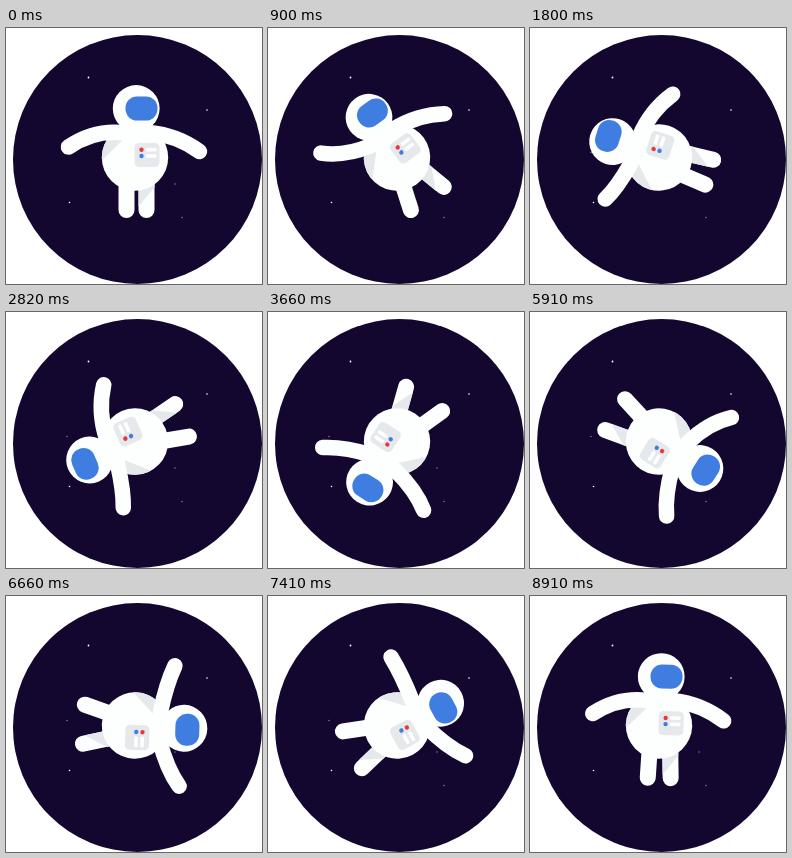
Recreate the animation shown at these times as an HTML page. Size 256 by 256 pixels, loop 8.94 s.

```html
<!DOCTYPE html>
<html lang="en">
<head>
<meta charset="utf-8">
<title>Floating astronaut</title>
<style>
  html, body { margin: 0; width: 100%; height: 100%; overflow: hidden; background: #fff; }
  svg { display: block; width: 100vw; height: 100vh; }
  .suit { fill: #fdfefe; }
  .limb { fill: none; stroke: #fdfefe; stroke-linecap: round; }
  .shade { fill: #e6e9ec; }
  .blue { fill: #3f7de0; }
</style>
</head>
<body>
<svg viewBox="0 0 256 256">
  <defs>
    <clipPath id="belly"><circle r="33.2"/></clipPath>
  </defs>
  <circle cx="131.5" cy="131.5" r="124.5" fill="#13072f"/>
  <g fill="#fff">
    <circle cx="82.5" cy="49.5" r=".9"/>
    <circle cx="201" cy="82" r=".8"/>
    <circle cx="63.5" cy="174.5" r=".8"/>
    <g opacity=".55">
      <circle cx="176" cy="189.5" r=".7"/>
      <circle cx="169" cy="156" r=".7"/>
      <circle cx="61" cy="124.5" r=".7"/>
    </g>
  </g>
  <g id="astronaut">
    <path id="legL" class="limb" stroke-width="16" d="M-8.5 17V52.5"/>
    <g id="legR">
      <path class="limb" stroke-width="16" d="M11.5 17V52.5"/>
      <path class="shade" d="M3.5 24H19.5V30L3.5 49Z"/>
    </g>
    <circle class="suit" r="33.2"/>
    <path class="shade" clip-path="url(#belly)" d="M-38 -24L-11 -19L-35 5Z"/>
    <path id="armL" class="limb" stroke-width="15.5"/>
    <path id="armR" class="limb" stroke-width="15.5"/>
    <circle class="suit" cx="1.2" cy="-49" r="23.4"/>
    <rect id="visor" class="blue" x="-16" y="-12" width="32" height="24" rx="11.5"/>
    <rect class="shade" x="-.5" y="-14.5" width="25" height="24" rx="4.5"/>
    <circle cx="6.5" cy="-7.7" r="2.2" fill="#e5393c"/>
    <circle class="blue" cx="6.5" cy="-1.5" r="2.2"/>
    <g class="suit">
      <rect x="11" y="-9.5" width="10.5" height="3.6" rx="1"/>
      <rect x="11" y="-3.3" width="10.5" height="3.6" rx="1"/>
    </g>
  </g>
</svg>
<script>
const LOOP = 8940, STEP = 30;
const $ = id => document.getElementById(id);
const mix = (a, b, u) => a + (b - a) * u;
const place = (id, value) => $(id).setAttribute("transform", value);

// Turning points of each swing: [time in ms, level].
const spread = [[0, 0], [520, 1], [1800, .25], [3800, 1], [5910, .7], [7410, .9], [LOOP, .12]];
const liftL = [[0, 0], [830, 1], [1800, .74], [2820, .7], [4400, 1], [5910, 1], [7410, .44], [7900, 1], [LOOP, 0]];
const liftR = [[850, 0], [1304, 1], [1800, 0], [2820, 0], [3540, 1], [4500, .4], [5300, 1], [7400, 1], [7750, 0]];

// Arm poses, hanging and raised: hand x, hand y, bend.
const armL = { low: [-66.5, -10.5, -10], high: [-58.7, -48.7, 8] };
const armR = { low: [64.5, -6, -8], high: [59.2, -46, 5] };

// Eases from one turning point to the next, and holds at both ends.
function swing(keys, t) {
  const i = keys.findIndex(key => key[0] > t);
  if (i < 1) return keys.at(i)[1];
  const [t0, a] = keys[i - 1], [t1, b] = keys[i];
  return mix(a, b, (1 - Math.cos(Math.PI * (t - t0) / (t1 - t0))) / 2);
}
const pulse = (t, rise, top, fall, end) => swing([[rise, 0], [top, 1], [fall, 1], [end, 0]], t);

function drawArm(id, { low, high }, lift, tuck = 0) {
  const [handX, y, bend] = low.map((v, k) => mix(v, high[k], lift));
  const x = handX + tuck, side = Math.sign(x);
  const sx = 14 * side, sy = -25, cx = 42 * side;
  const cy = mix(sy, y, (cx - sx) / (x - sx)) + bend;
  $(id).setAttribute("d", `M${sx} ${sy}Q${cx} ${cy} ${x} ${y}`);
}

function draw(t) {
  const open = swing(spread, t);
  const lookX = pulse(t, 1500, 2600, 6000, 7400);
  const lookY = pulse(t, 500, 1700, 6000, 7500);
  place("astronaut", `translate(129 129.5) rotate(${-360 * t / LOOP})`);
  place("legL", `rotate(${22 * open} -8.5 17)`);
  place("legR", `rotate(${-17 * open} 11.5 17)`);
  place("visor", `translate(${6.5 - 7 * lookX} ${-49 - 5.8 * lookY})`);
  drawArm("armL", armL, swing(liftL, t), 5 * pulse(t, 900, 1800, 2820, 3800));
  drawArm("armR", armR, swing(liftR, t));
}

const start = performance.now();
function tick() {
  const t = (performance.now() - start) % LOOP;
  draw(Math.floor(t / STEP) * STEP);
  requestAnimationFrame(tick);
}
draw(0);
requestAnimationFrame(tick);
</script>
</body>
</html>
```
